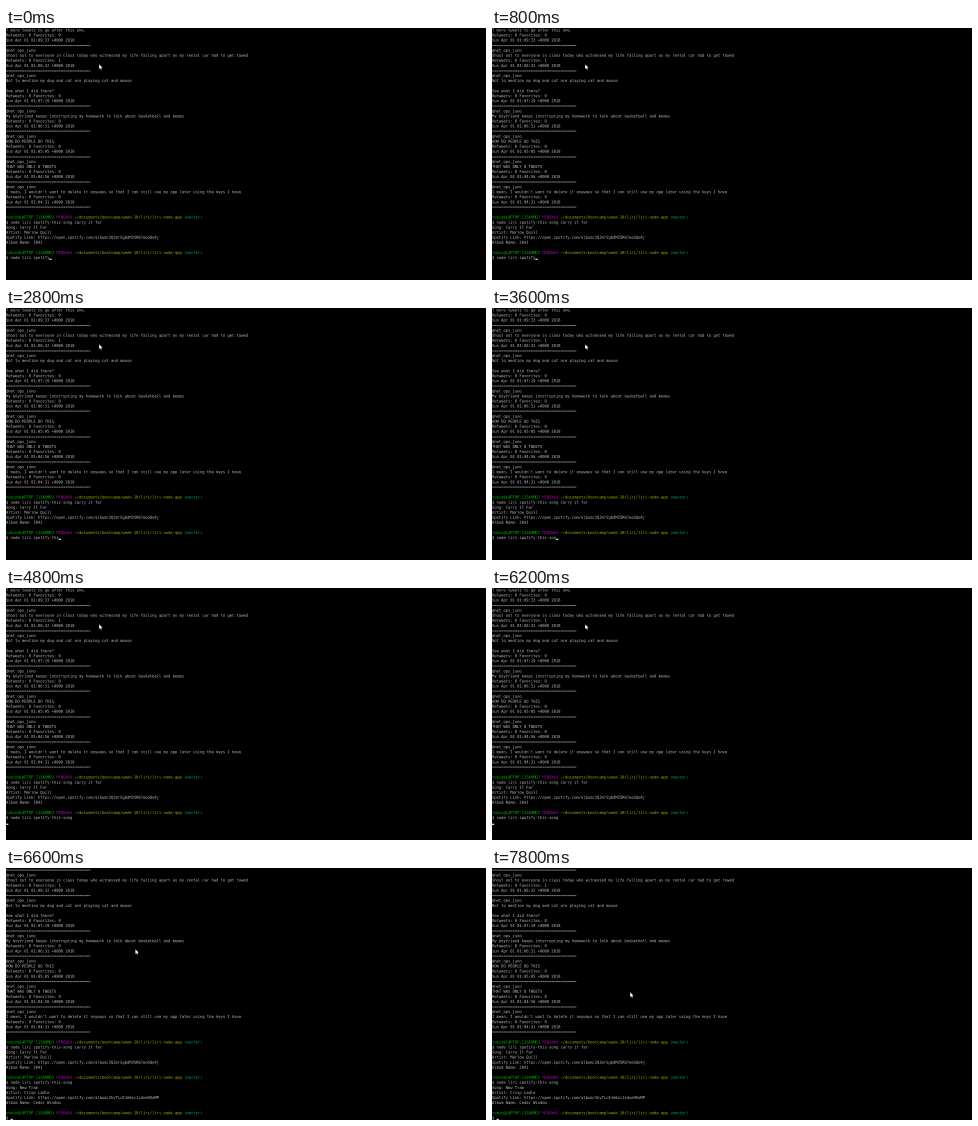
An HTML page with a canvas for the animation above (8000 ms loop, 480 px wide and 252 px high).

```html
<!DOCTYPE html>
<html lang="en">
<head>
<meta charset="utf-8">
<title>Terminal session</title>
<style>
  html, body { margin: 0; width: 100%; height: 100%; overflow: hidden; background: #000; }
  canvas { display: block; width: 480px; height: 252px; }
</style>
</head>
<body>
<canvas id="stage" width="480" height="252"></canvas>
<script>
const W = 480, H = 252, LOOP = 8000, STEP = 200;
const CELL = 2.283, ROW = 5.056, BASE = 3.5, SS = 4;
const GRAY = '#bfbfbf', GREEN = '#00bf00', PURPLE = '#b000b0', OLIVE = '#b0b000', TEAL = '#00a878';

const out = document.getElementById('stage').getContext('2d');
const buffer = document.createElement('canvas');
buffer.width = W * SS;
buffer.height = H * SS;
const ctx = buffer.getContext('2d');

const RULE = '='.repeat(37);
const stats = (favs, time) => [
  `Retweets: 0 Favorites: ${favs}`,
  `Sun Apr 01 01:${time} +0000 2018`,
  RULE
];
const tweet = (lines, favs, time) => ['@net_ops_juno', ...lines, ...stats(favs, time)];
const album = (song, artist, id, name) => [
  `Song: ${song}`,
  `Artist: ${artist}`,
  `Spotify Link: https://open.spotify.com/album/${id}`,
  `Album Name: ${name}`,
  ''
];
const PROMPT = [
  ['tobin@LAPTOP-11SA9MDJ ', GREEN],
  ['MINGW64 ', PURPLE],
  ['~/documents/bootcamp/week-10/liri/liri-node-app ', OLIVE],
  ['(master)', TEAL]
];

const history = [
  '7 more tweets to go after this one.',
  ...stats(0, '09:33'),
  ...tweet(['Shout out to everyone in class today who witnessed my life falling apart as my rental car had to get towed'], 1, '08:32'),
  ...tweet(['Not to mention my dog and cat are playing cat and mouse', '', 'See what I did there?'], 0, '07:19'),
  ...tweet(['My boyfriend keeps interrupting my homework to talk about basketball and memes'], 0, '06:31'),
  ...tweet(['HOW DO PEOPLE DO THIS'], 0, '05:05'),
  ...tweet(['THAT WAS ONLY 8 TWEETS'], 0, '04:56'),
  ...tweet(["I mean, I wouldn't want to delete it anyways so that I can still use my app later using the keys I have"], 0, '04:31'),
  '',
  PROMPT,
  '$ node liri spotify-this-song carry it far',
  ...album('Carry It Far', 'Marlow Quill', '2QJmrSgbdM35R67eoGQo4j', '2041'),
  PROMPT
];
const result = album('New Tram', 'Crisp Ladle', '2kyTLcEJe6sc1sdveHXoMP', 'Cedar Window');
const COMMAND = 'spotify-this-song';

// [start ms, value]
const TYPED = [[0, 7], [2000, 8], [2400, 9], [2600, 10], [2800, 11], [3000, 12],
  [3200, 13], [3400, 15], [3600, 16], [3800, 17]];
const CARET = [[0, 1], [400, 0], [800, 1], [1400, 0], [2000, 1], [5000, 0],
  [5600, 1], [7200, 0], [7800, 1]];
const POINTER = [[0, [93.2, 36.4]], [6400, [114.7, 63.3]], [6600, [129.4, 81.3]],
  [6800, [134, 91]], [7000, [136.5, 98.5]], [7200, [138, 114]], [7400, [138.2, 124.4]]];
const ENTER = 4400, PRINT = 6400, DONE = 6600;

const at = (table, t) => table.filter(([start]) => start <= t).pop()[1];

function screen(t) {
  const rows = [...history, '$ node liri ' + COMMAND.slice(0, at(TYPED, t))];
  if (t >= PRINT) rows.push(...result.slice(0, 4));
  if (t >= DONE) rows.push('', PROMPT, '$ ');
  else if (t >= ENTER) rows.push('');
  return rows;
}

function drawText(text, col, y, color) {
  ctx.fillStyle = color;
  for (const ch of text) {
    if (ch !== ' ') ctx.fillText(ch, col * CELL * SS, y * SS);
    col++;
  }
  return col;
}

function drawPointer([x, y]) {
  const shape = [[0, 0], [0, 4.6], [1.1, 3.7], [1.8, 5.3], [2.6, 5], [1.9, 3.4], [3.3, 3.3]];
  ctx.beginPath();
  for (const [dx, dy] of shape) ctx.lineTo((x + dx) * SS, (y + dy) * SS);
  ctx.closePath();
  ctx.lineWidth = 0.8 * SS;
  ctx.strokeStyle = '#000';
  ctx.stroke();
  ctx.fillStyle = '#fff';
  ctx.fill();
}

function draw(t) {
  ctx.fillStyle = '#000';
  ctx.fillRect(0, 0, W * SS, H * SS);
  ctx.font = `${3.79 * SS}px "DejaVu Sans Mono", "Liberation Mono", monospace`;

  const rows = screen(t);
  const scroll = t >= DONE ? 3 : t >= PRINT ? 1 : 0;
  let y = BASE - scroll * ROW, col = 0;
  rows.forEach((row, i) => {
    const parts = Array.isArray(row) ? row : [[row, GRAY]];
    col = 0;
    if (i) y += ROW;
    for (const [text, color] of parts) col = drawText(text, col, y, color);
  });
  if (t >= PRINT && t < DONE) {
    y += ROW;
    col = 0;
  }
  if (at(CARET, t)) {
    ctx.fillStyle = '#d8d8d8';
    ctx.fillRect(col * CELL * SS, (y - 0.4) * SS, CELL * SS, 1.3 * SS);
  }
  drawPointer(at(POINTER, t));

  out.imageSmoothingEnabled = true;
  out.imageSmoothingQuality = 'high';
  out.drawImage(buffer, 0, 0, W, H);
}

const begin = performance.now();
let shown = -1;
function tick() {
  const t = Math.floor(((performance.now() - begin) % LOOP) / STEP) * STEP;
  if (t !== shown) draw(shown = t);
  requestAnimationFrame(tick);
}
tick();
</script>
</body>
</html>
```
